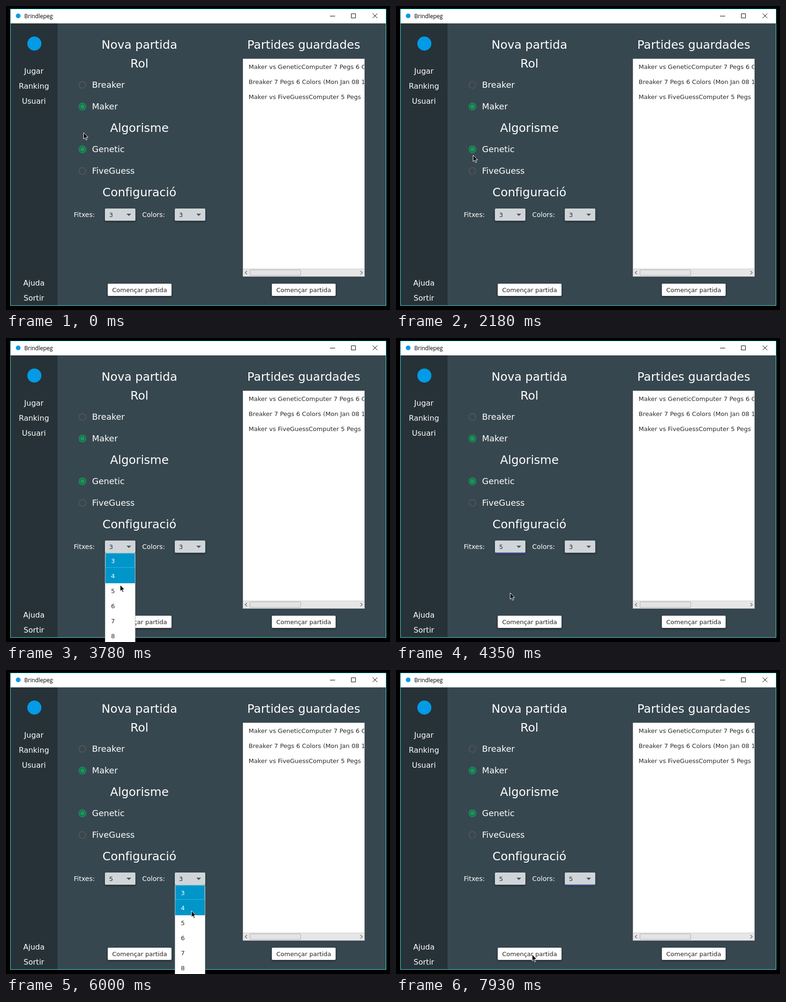
Write an HTML page that moves like this. It is 819 px wide and 647 px high and loops after 8 s.

```html
<!DOCTYPE html>
<html lang="ca">
<head>
<meta charset="utf-8">
<title>Brindlepeg</title>
<style>
html, body { margin: 0; width: 100%; height: 100%; overflow: hidden; background: #000; }
svg { display: block; width: 819px; height: 647px; font-family: "DejaVu Sans", sans-serif; }
.h { font-size: 25px; fill: #fff; text-anchor: middle; }
.nav { font-size: 16px; fill: #fff; text-anchor: middle; }
.opt { font-size: 18px; fill: #fff; }
.label { font-size: 14px; fill: #fff; }
.item { font-size: 13px; fill: #2b2b2b; }
.hot { font-size: 13px; fill: #fff; }
.btn { font-size: 13px; fill: #222; text-anchor: middle; }
.line { fill: none; stroke: #000; }
.raised { filter: drop-shadow(0 2px 2px rgba(0, 0, 0, .4)); }

/* Every state change is a hard cut on one shared 8 s clock. */
.t { animation: 8s step-end infinite; }
.five { animation-name: five; }
.genetic { animation-name: genetic; }
.menu1 { animation-name: menu1; }
.menu1-4 { animation-name: menu1-4; }
.menu1-5 { animation-name: menu1-5; }
.old1 { animation-name: old1; }
.new1 { animation-name: new1; }
.focus1 { animation-name: focus1; }
.menu2 { animation-name: menu2; }
.menu2-4 { animation-name: menu2-4; }
.menu2-5 { animation-name: menu2-5; }
.old2 { animation-name: old2; }
.new2 { animation-name: new2; }
.cursor { animation-name: cursor; }

@keyframes five { 0%, 25.58%, 100% { opacity: 0 } 10.42%, 23.89% { opacity: .5 } 12.125% { opacity: 1 } }
@keyframes genetic { 0%, 25.58%, 100% { opacity: 1 } 10.42%, 23.89% { opacity: .5 } 12.125% { opacity: 0 } }
@keyframes menu1 { 0%, 52.5%, 100% { opacity: 0 } 38.5% { opacity: 1 } }
@keyframes menu1-4 { 0%, 48.94%, 100% { opacity: 0 } 47.25% { opacity: 1 } }
@keyframes menu1-5 { 0%, 52.5%, 100% { opacity: 0 } 48.94% { opacity: 1 } }
@keyframes old1 { 0% { opacity: 1 } 52.5%, 100% { opacity: 0 } }
@keyframes new1 { 0% { opacity: 0 } 52.5%, 100% { opacity: 1 } }
@keyframes focus1 { 0%, 68%, 100% { opacity: 0 } 52.5% { opacity: 1 } }
@keyframes menu2 { 0%, 80%, 100% { opacity: 0 } 68% { opacity: 1 } }
@keyframes menu2-4 { 0%, 76.75%, 100% { opacity: 0 } 75% { opacity: 1 } }
@keyframes menu2-5 { 0%, 80%, 100% { opacity: 0 } 76.75% { opacity: 1 } }
@keyframes old2 { 0% { opacity: 1 } 80%, 100% { opacity: 0 } }
@keyframes new2 { 0% { opacity: 0 } 80%, 100% { opacity: 1 } }

@keyframes cursor {
  0% { transform: translate(165px, 269px) }
  1.875% { transform: translate(165px, 269px); animation-timing-function: steps(5, jump-start) }
  10.42% { transform: translate(175px, 351px) }
  15.5% { transform: translate(175px, 351px); animation-timing-function: steps(5, jump-start) }
  23.89% { transform: translate(166px, 303px) }
  25.58% { transform: translate(166px, 303px); animation-timing-function: steps(2, jump-start) }
  28.75% { transform: translate(164px, 317px); animation-timing-function: steps(1, jump-start) }
  30.34% { transform: translate(165px, 300px); animation-timing-function: steps(4, jump-start) }
  36.71% { transform: translate(237px, 444px) }
  43.875% { transform: translate(237px, 444px); animation-timing-function: steps(3, jump-start) }
  48.94% { transform: translate(243px, 525px); animation-timing-function: steps(1, jump-start) }
  50.6% { transform: translate(243px, 542px) }
  56.25% { transform: translate(243px, 542px); animation-timing-function: steps(1, jump-start) }
  57.75% { transform: translate(304px, 503px); animation-timing-function: steps(5, jump-start) }
  66.34% { transform: translate(392px, 444px) }
  71.5% { transform: translate(392px, 444px); animation-timing-function: steps(3, jump-start) }
  76.75% { transform: translate(395px, 512px); animation-timing-function: steps(1, jump-start) }
  78.375% { transform: translate(395px, 530px) }
  83.375% { transform: translate(394px, 533px) }
  92.625% { transform: translate(394px, 533px); animation-timing-function: steps(4, jump-start) }
  99.125% { transform: translate(311px, 591px); animation-timing-function: steps(1, jump-start) }
  100% { transform: translate(290px, 605px) }
}
</style>
</head>
<body>
<svg viewBox="0 0 819 647">
  <defs>
    <circle id="ring" r="7.2" fill="none" stroke="#565558" stroke-width="1.8"/>
    <g id="picked">
      <circle r="7.2" fill="none" stroke="#0f9d58" stroke-width="1.8"/>
      <circle r="4.8" fill="#0f9d58"/>
    </g>
    <g id="combo">
      <rect class="raised" x="211" y="431" width="65" height="26" rx="2" fill="#cfd5d8"/>
      <path d="M257 442h10l-5 5z" fill="#555"/>
    </g>
    <path id="focus" d="M211 457.5h65" stroke="#4059a9" stroke-width="2"/>
    <g id="menu">
      <path d="M211.5 650V457.5h64V650" fill="#fff" stroke="#b4bcc0"/>
      <path d="M212 458h63v32h-63z" fill="#0096c9"/>
      <path d="M212.500 458.500h62v30h-62z" fill="none" stroke="#3db0dc"/>
      <text class="hot" x="224" y="479">3</text>
      <g class="item">
        <text x="224" y="511">4</text>
        <text x="224" y="543">5</text>
        <text x="224" y="575">6</text>
        <text x="224" y="607">7</text>
        <text x="224" y="639">8</text>
      </g>
    </g>
    <g id="hot4">
      <path d="M212 490h63v32h-63z" fill="#0096c9"/>
      <text class="hot" x="224" y="511">4</text>
    </g>
    <g id="hot5">
      <path d="M212 522h63v32h-63z" fill="#0096c9"/>
      <text class="hot" x="224" y="543">5</text>
    </g>
    <g id="start">
      <rect class="raised" x="217" y="591" width="136" height="26" rx="2" fill="#fff"/>
      <text class="btn" x="285" y="609">Començar partida</text>
    </g>
    <clipPath id="view"><path d="M506 113h258v446h-258z"/></clipPath>
  </defs>

  <!-- window -->
  <path d="M0 0h819v647H0z"/>
  <path d="M9.500 6.500h801v631h-801z" fill="#37474f" stroke="#4fdde0"/>
  <path d="M10 7h800v30H10z" fill="#fff"/>
  <path d="M10 37h100v600H10z" fill="#263238"/>
  <circle cx="26" cy="21" r="5" fill="#039be5"/>
  <text x="39" y="26" font-size="12" style="font-family:'Open Sans',sans-serif">Brindlepeg</text>
  <path class="line" d="M691 21.500h11M736.500 16.500h9v9h-9z"/>
  <path class="line" d="M782 16l10 10M792 16l-10 10"/>

  <!-- sidebar -->
  <circle cx="60.500" cy="80" r="15" fill="#039be5"/>
  <g class="nav">
    <text x="59.500" y="144">Jugar</text>
    <text x="59.500" y="176">Ranking</text>
    <text x="59.500" y="208">Usuari</text>
    <text x="59.500" y="595">Ajuda</text>
    <text x="59.500" y="627">Sortir</text>
  </g>

  <!-- new game -->
  <g class="h">
    <text x="284.500" y="91">Nova partida</text>
    <text x="284.500" y="131">Rol</text>
    <text x="284.500" y="268">Algorisme</text>
    <text x="284.500" y="405">Configuració</text>
    <text x="635" y="91">Partides guardades</text>
  </g>
  <use href="#ring" x="163" y="168"/>
  <use href="#picked" x="163" y="214"/>
  <use href="#ring" x="163" y="305"/>
  <use href="#picked" x="163" y="305" class="t genetic"/>
  <use href="#ring" x="163" y="351"/>
  <use href="#picked" x="163" y="351" class="t five"/>
  <g class="opt">
    <text x="183.500" y="174">Breaker</text>
    <text x="183.500" y="220">Maker</text>
    <text x="183.500" y="311">Genetic</text>
    <text x="183.500" y="357">FiveGuess</text>
  </g>
  <text class="label" x="144.500" y="449">Fitxes:</text>
  <text class="label" x="290.500" y="449">Colors:</text>
  <use href="#start"/>
  <use href="#start" x="350"/>

  <!-- saved games -->
  <path d="M505.500 112.500h259v463h-259z" fill="#fff" stroke="#c8c8c8"/>
  <g class="item" clip-path="url(#view)">
    <text x="517.500" y="134">Maker vs GeneticComputer 7 Pegs 6 Colors</text>
    <text x="517.500" y="166">Breaker 7 Pegs 6 Colors (Mon Jan 08 1</text>
    <text x="517.500" y="198">Maker vs FiveGuessComputer 5 Pegs</text>
  </g>
  <path d="M506 559h258v16H506z" fill="#e6e6e6"/>
  <path d="M506 559.500h258" stroke="#cfcfcf"/>
  <rect x="520.500" y="561.500" width="108" height="12" rx="1.500" fill="#e4e4e4" stroke="#b0b0b0"/>
  <path d="M514 564l-4 3.500 4 3.500M756 564l4 3.500-4 3.500" fill="none" stroke="#666" stroke-width="1.200"/>

  <!-- selectors -->
  <use href="#combo"/>
  <use href="#combo" x="149"/>
  <g class="item">
    <text class="t old1" x="220" y="449">3</text>
    <text class="t new1" x="220" y="449">5</text>
    <text class="t old2" x="369" y="449">3</text>
    <text class="t new2" x="369" y="449">5</text>
  </g>
  <use href="#focus" class="t focus1"/>
  <use href="#focus" x="149" class="t new2"/>
  <g class="t menu1">
    <use href="#menu"/>
    <use href="#hot4" class="t menu1-4"/>
    <use href="#hot5" class="t menu1-5"/>
  </g>
  <g transform="translate(149)">
    <g class="t menu2">
      <use href="#menu"/>
      <use href="#hot4" class="t menu2-4"/>
      <use href="#hot5" class="t menu2-5"/>
    </g>
  </g>

  <path class="t cursor" d="M.5.5v13.500l3.100-2.800 2.100 5 2.200-1-2.100-4.800h4.200z" stroke="#fff"/>
</svg>
</body>
</html>
```
